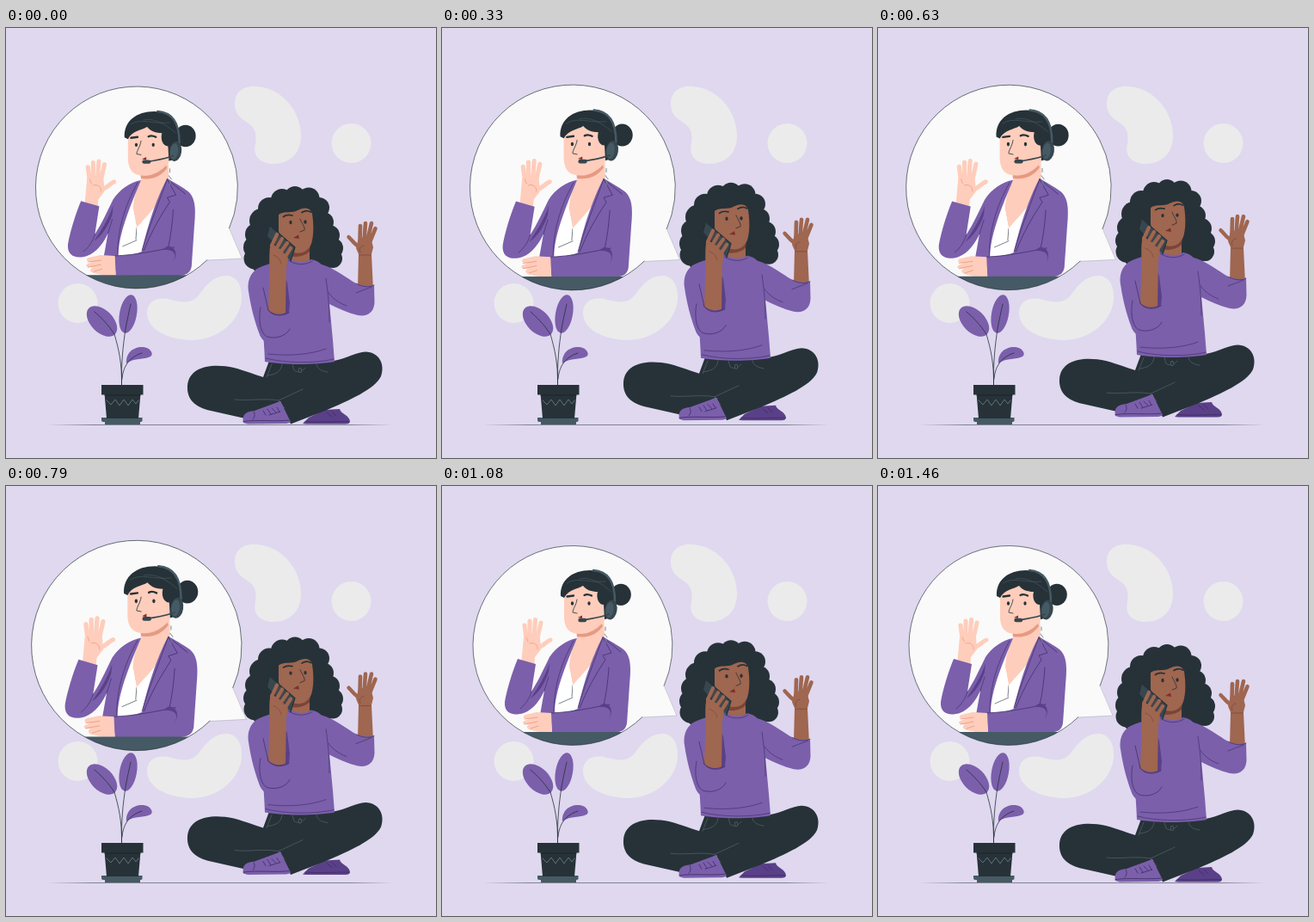
Recreate the animation shown at these times as an HTML page with a canvas. Size 500 by 500 pixels, loop 1500 ms.

```html
<!DOCTYPE html>
<html lang="en">
<head>
<meta charset="utf-8">
<title>Support call</title>
<style>
html, body { margin: 0; width: 100%; height: 100%; overflow: hidden; background: #dfd8ef; }
canvas { display: block; }
</style>
</head>
<body>
<canvas id="stage" width="500" height="500"></canvas>
<script>
const ctx = document.getElementById('stage').getContext('2d');
const LOOP = 1500, STEPS = 36;
const C = {
  bg: '#dfd8ef', blob: '#ebebeb', white: '#fafafa', ink: '#263238', steel: '#37474f', slate: '#455a64', grey: '#70838c',
  purple: '#7b5fab', shade: '#5a4088', crease: '#43316a',
  pale: '#ffcdbb', paleLine: '#e59a84', brown: '#9f6650', brownShade: '#7a4538', lip: '#7d302c'
};
ctx.lineCap = ctx.lineJoin = 'round';

function fill(d, color) {
  ctx.fillStyle = color;
  ctx.fill(new Path2D(d));
}
function line(d, color = C.ink, width = 0.8) {
  ctx.strokeStyle = color;
  ctx.lineWidth = width;
  ctx.stroke(new Path2D(d));
}
function oval(x, y, rx, ry, color, angle = 0) {
  ctx.fillStyle = color;
  ctx.beginPath();
  ctx.ellipse(x, y, rx, ry, angle, 0, 7);
  ctx.fill();
}
const dot = (x, y, r, color) => oval(x, y, r, r, color);

function backdrop() {
  ctx.fillStyle = C.bg;
  ctx.fillRect(0, 0, 500, 500);
  fill('M266 88C266 73 278 66 293 68C325 72 343 100 343 125C343 146 330 158 310 158C293 157 287 147 290 135C293 117 285 113 276 107C269 102 266 96 266 88Z', C.blob);
  fill('M164 330C165 316 178 312 192 316C212 321 219 318 226 308C235 296 243 288 257 288C270 289 275 302 274 316C272 340 248 363 215 363C187 362 163 350 164 330Z', C.blob);
  dot(401.5, 134, 23, C.blob);
  dot(83.5, 320, 23, C.blob);
  fill('M48 461.3L100 461H400L449 461.3L400 461.6H100Z', C.ink);
}

function plant() {
  oval(111.5, 341, 21.5, 13, C.purple, 0.79);
  oval(142, 332.5, 22.5, 10, C.purple, -1.39);
  fill('M140 390C139 378 148 370 160 371C169 372 172 380 168 382C160 386 150 383 140 390Z', C.purple);
  line('M134.500 415C135 390 131 373 126 356C119 345 110 336 103 330M134.500 415C134 388 136 370 139 350C141 339 143 330 145 321M135 408C136 395 142 383 158 378', C.ink, 0.8);
  fill('M111 453H158.500V457Q158 458 156 458H113Q111 458 111 456Z', C.slate);
  fill('M115 458H156V461H115Z', C.slate);
  fill('M114.500 425H156.500L154 454H117Z', C.ink);
  fill('M111 415H159.500V426.500H111Z', C.ink);
  line('M115 427H156', '#172126', 0.8);
  line('M117 433L122 438L127 432L132 439L137 432L142 439L147 432L151 437L154 433', C.grey, 0.8);
}

function operatorBody() {
  fill('M154 160L188 145L189 178C186 199 171 211 152 232L145 198L157 177Z', C.pale);
  fill('M145 194L130 215L127 267L163 262L190 194L152 232Z', '#ffffff');
  line('M152 232L151 245M136 253L152 246', C.ink, 0.6);

  line('M98 178L96 162M102 176L102 157M107 175L108.500 155.500M111 177L115 159', C.pale, 5);
  line('M111 188C117 187 121 181 126 179', C.pale, 5);
  fill('M95 175C101 171 109 171 114 176L115 190L108 199L107 211L92 208Z', C.pale);
  line('M102 183C107 181 112 185 111 190M98 176L100 181', C.paleLine, 0.7);

  fill('M157 177L145 194L152 232C145 211 148 195 157 177Z', '#ffffff');
  fill('M157 177C145 179 132 188 125 199C118 213 113 225 104 239L109 207L88 201C82 215 75 238 73 251C72 264 82 268 95 264C106 260 114 249 119 238L114 266L131 264C131 244 139 219 157 177Z', C.purple);
  fill('M125 206C120 222 111 235 103 247C112 241 120 229 124 216Z', C.shade);
  line('M153 180C139 205 130 232 130 262M104 239C102 247 97 254 91 259M124 222L119 238', C.crease, 0.7);

  fill('M189 175L183 187C179 205 164 217 152 232L154 250L166 238L190 194Z', '#ffffff');
  fill('M187 175C193 179 203 184 211 190C220 198 220 211 218 232L215 276C213 286 206 287 190 287L128 286.500L126 264C145 263 151 262 158 259C163 235 174 199 187 175Z', C.purple);
  line('M187 176L197 194L187 197L190 202C178 220 168 238 160 258M187 176C178 201 166 231 158 258M192 180L208 193', C.crease, 0.8);
  line('M194 211C193 227 191 242 188 255M127 264C151 263 174 258 195 254', C.crease, 0.8);
  fill('M187 253C196 252 200 262 194 271C199 261 194 256 181 257Z', C.shade);

  fill('M127 264L110 263L97 266C93 268 94 271 101 271L96 273C92 275 94 278 101 277C97 280 99 283 104 284L113 286H128Z', C.pale);
  line('M96 271L111 269M96 277L111 274M103 282L112 279', C.paleLine, 0.8);
}

function operatorHead() {
  oval(208, 126.3, 11.8, 12.6, C.ink);
  fill('M157 171C169 173 180 166 185 158L187 163C179 174 168 177 157 175Z', C.paleLine);
  fill('M142 125C152 115 177 113 187 121L192 150C188 161 175 172 161 172C148 172 143 166 142 154Z', C.pale);
  fill('M138 128C137 109 152 98 172 98C190 98 202 111 201 132L198 153L189 155L188 138C182 138 179 130 181 123C174 123 168 121 164 116C158 120 147 120 142 130Z', C.ink);
  line('M145 113C157 105 170 113 190 111M160 108C174 105 188 115 197 123', '#52636c', 0.5);
  line('M176 98C192 99 201 111 201 134', C.slate, 2.4);
  oval(196.5, 144, 7, 11.5, C.steel, 0.15);
  oval(195, 144, 4.5, 9, C.slate, 0.15);
  line('M194 149C184 153 174 154 164 156', C.steel, 1.7);
  line('M145.500 128.500L153 127.500M165.500 127C168 125.500 171 126 174 127.500', C.ink, 2.3);
  oval(151.5, 136.5, 1.6, 2.2, C.ink);
  oval(171, 136.5, 1.6, 2.2, C.ink);
  line('M157 132C156 139 152 143 152 147L157 148', C.ink, 0.8);
  fill('M158 153L163 150.500V154Z', C.lip);
  line('M160.500 156H166', C.steel, 4.4);
  line('M190 164V168M189 172L192 176M190 178V184', C.grey, 0.9);
}

const ring = new Path2D();
ring.arc(152, 185.5, 116, 0.8, Math.PI * 2 + 0.413);
const balloon = new Path2D(ring);
balloon.lineTo(273, 267);
balloon.closePath();

function bubble(scale) {
  ctx.save();
  ctx.translate(154.5, 185.5);
  ctx.scale(scale, scale);
  ctx.translate(-154.5, -185.5);
  ctx.fillStyle = C.white;
  ctx.fill(balloon);
  ctx.save();
  ctx.clip(balloon);
  operatorBody();
  operatorHead();
  fill('M36 286H215V303H36Z', C.slate);
  ctx.restore();
  ctx.strokeStyle = C.ink;
  ctx.lineWidth = 0.65;
  ctx.stroke(ring);
  line('M258 232L273 267L233 269', '#7a8087', 0.3);
  ctx.restore();
}

function hair() {
  const curls = [
    [336, 196, 12], [321, 200, 13], [352, 198, 12.5], [306, 210, 13],
    [364, 209, 12], [297, 224, 14], [369, 226, 12], [291, 240, 13],
    [376, 241, 12], [289, 255, 13], [380, 256, 12], [289, 268, 12.5],
    [380, 268, 11], [297, 273, 12], [368, 273, 11], [311, 272, 13], [356, 270, 12]
  ];
  fill('M298 218L336 191L363 213L379 268L352 278L292 274Z', C.ink);
  for (const [x, y, r] of curls) dot(x, y, r, C.ink);
}

function face() {
  fill('M329 250L353 247L353 271C348 276 336 277 330 271Z', C.brown);
  fill('M331 260C341 264 350 257 354 250L353 260C346 266 337 267 331 265Z', C.brownShade);
  fill('M317 217C324 212 332 216 339 212C346 208 354 208 356 216C358 229 358 241 355 251C351 260 344 263 335 261C324 258 319 247 317 236Z', C.brown);
  line('M322.500 219.500C325 217.500 329 217 333 218M344 214.500C347 212.500 351 212 354.500 214', C.ink, 1.7);
  oval(331, 226, 1.6, 2.2, C.ink);
  oval(348, 225.5, 1.6, 2.2, C.ink);
  line('M342 222C344 227 348 232 347 235L342 237', C.ink, 0.8);
  fill('M334 244L340 240.500L341 245Z', C.lip);
}

function wavingArm() {
  line('M411.500 247L412 230M416.500 246L418 227M420.500 246L425 227M423 249L429.500 233', C.brown, 4.6);
  line('M411 254C406 253 403 247 398.500 243', C.brown, 4.4);
  fill('M409.500 246C414 242 421 242 425 247L427 255L425 263L427 305L409 302L410 263L407 256Z', C.brown);
  line('M416 253C412 253 410 258 412 261M411 264H424', C.brownShade, 0.7);
  fill('M364 274C383 279 396 291 407 297C415 300 422 301 428 298.500L428.500 319C428 331 420 336 409 334C397 331 386 326 376 321Z', C.purple);
  line('M407 297C414 301 422 302 428 299M371 299C374 310 383 318 396 323M407 308L425 301', C.crease, 0.7);
}

function pants() {
  fill('M306 387H381C397 384 407 377 418 376.500C434 377 441 391 436 405C429 420 399 433 371 445L331 460.500L319 434L278 454L238 445C220 441 210 432 211 416C213 393 240 389.500 265 395C280 399 292 404 299 406Z', C.ink);
  line('M266 432C281 434 298 430 317 433L345 420M317 433L324 442M303 406L309 391M321 391C320 400 313 403 304 404M333 391L335 398C339 401 344 400 348 395M361 391C362 397 368 399 374 400', '#53636b', 0.7);
  oval(342, 398, 2, 3, '#53636b');
  oval(342, 398, 1.3, 2.2, C.ink);
}

function backShoe() {
  fill('M345 460L352 453L371 444L388 443C389 449 400 450 400 458Q399 460.500 395 460.500H349Z', C.shade);
  line('M348 457.500C366 459 382 457 399 457.500M373 447L379 452M379 446L384 451', '#3f2b63', 0.8);
}

function frontShoe() {
  fill('M276 459C274 449 279 446 289 445L319 434L331 458Q329 460 323 460L281 460.500Z', C.purple);
  line('M276 457.500C293 455 312 458 329 456M288 446C290 449 289 453 287 455M299 445L302 450M304 443L308 449M309 442L314 447M315 441L318 446M306 450L319 446', C.crease, 0.9);
}

function torso() {
  fill('M330 268C339 274 348 273 355 269C365 271 372 277 373.500 292C376 324 380 357 382 388C360 392 324 392 301 388C300 358 297 330 293 304L290 281C301 275 316 271 330 268Z', C.purple);
  line('M328 270C337 276 348 276 356 271M302 384C326 390 359 390 381 385M372 291C374 306 376 319 376 342M305 379C332 382 356 379 372 373', C.crease, 0.7);
}

function phoneArm() {
  fill('M307 230L336 255L331 271L304 242Z', C.steel);
  line('M307 230L336 255L331 271', C.ink, 1.2);
  fill('M299 278C286 280 280 292 282 306C285 327 290 343 294 354C298 369 316 373 326 367C332 362 331 347 330 322L313 305Z', C.purple);
  fill('M322 284L327 296L330 320L329 331C319 336 308 334 304 327Z', C.shade);
  fill('M308 250C305 260 307 277 306 296L305 328C311 333 319 334 325 331L326 278L328 267L320 258Z', C.brown);
  line('M309 253L315 240M314 257L321 245M319 261L327 250M324 267L331 256', C.brown, 4.3);
  line('M312 251L318 243M317 256L324 248M322 262L329 254M311 264C316 266 319 269 320 274', C.brownShade, 0.6);
  line('M305 328C310 335 320 336 329 331M296 325C293 340 296 356 304 359C314 362 326 358 330 350M299 302L305 328', C.crease, 0.8);
}

function caller(lift) {
  ctx.save();
  ctx.translate(0, -lift);
  hair();
  face();
  wavingArm();
  backShoe();
  pants();
  frontShoe();
  torso();
  phoneArm();
  ctx.restore();
}

// Two beats per loop, linear between [phase, scale] keys.
const PEAK = 1.092;
const BEAT = [[0, 1], [0.1, PEAK], [0.3, 1], [0.4, 1], [0.5, PEAK], [0.6, 1], [1, 1]];
function beat(p) {
  const i = BEAT.findIndex(([at]) => at > p);
  const [t0, s0] = BEAT[i - 1], [t1, s1] = BEAT[i];
  return s0 + (s1 - s0) * (p - t0) / (t1 - t0);
}

function draw(now) {
  const step = Math.min(STEPS - 1, Math.floor((now % LOOP + 5) / LOOP * STEPS));
  const phase = (step + 0.5) / STEPS;
  backdrop();
  plant();
  bubble(beat(phase));
  caller(9.5 * (1 - Math.abs(2 * phase - 1)) - 0.3);
  requestAnimationFrame(draw);
}
requestAnimationFrame(draw);
</script>
</body>
</html>
```
